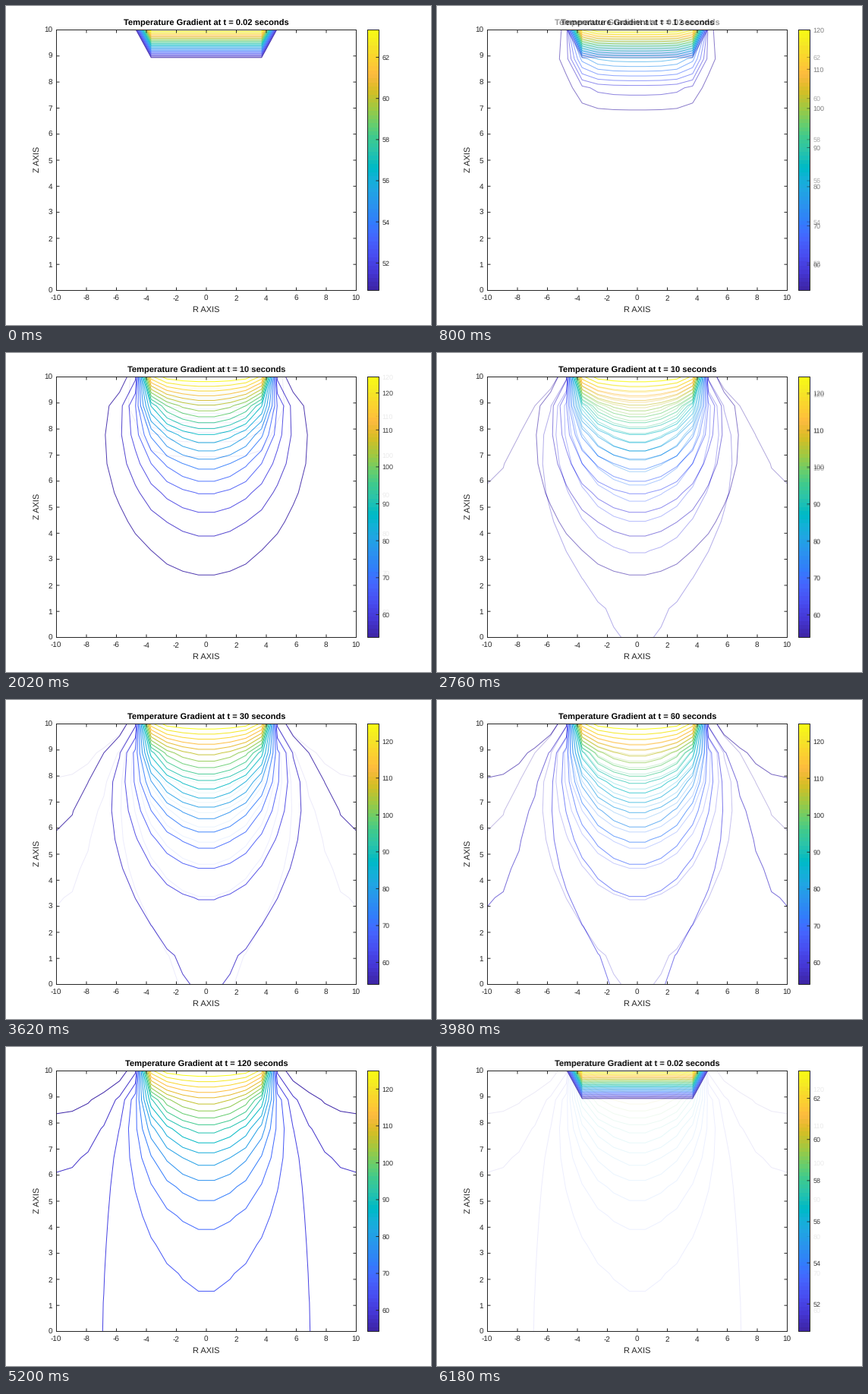
A matplotlib script that plays this animation: 560 px wide and 420 px high, repeating every 6240 ms.

```python
import numpy as np
import matplotlib.pyplot as plt
from matplotlib.animation import FuncAnimation
from matplotlib.colors import LinearSegmentedColormap

W, H, DPI = 560, 420, 100
PT = 72 / DPI                       # points per pixel
STEP_MS, HOLD_MS, FADE_MS, FADES = 20, 500, 60, 9
STAGE_MS = HOLD_MS + FADE_MS * FADES
LEFT, RIGHT, TOP, BOTTOM = 66.5, 461.5, 31.5, 374.5
BAR_LEFT, BAR_RIGHT = 476.5, 491.5
INK = "#262626"
TIMES = ["0.02", "1", "10", "30", "60", "120"]

plt.rcParams["font.family"] = "Liberation Sans"
plt.rcParams["text.hinting"] = "none"

STOPS = {0: "#3E26A8", 4: "#4537D5", 8: "#484DF0", 12: "#4563FD", 14: "#3E6FFF",
         16: "#327CFC", 20: "#2B91EF", 24: "#20A5E3", 27: "#12B1D6", 29: "#01B8CA",
         30: "#02BAC3", 32: "#19BFB6", 34: "#2CC4A7", 37: "#3FCA8E", 40: "#64CD6F",
         44: "#9DC943", 48: "#D1BF27", 50: "#E6BB2D", 52: "#F8BA3D", 53: "#FEBE3C",
         57: "#FAD62D", 60: "#F5E924", 63: "#F9FB15"}
CMAP = LinearSegmentedColormap.from_list(
    "heat", [(i / 63, c) for i, c in STOPS.items()], N=64)


def simulate(times, n=10, size=10.0, dt=0.02):
    """Heat flow in a cylinder, warmed on a disc of its top face (row 0)."""
    d = size / (n - 1)
    fourier = 1.06 * dt / d**2
    biot = 4.43 * d
    col = np.arange(n)
    drive = np.where(col < 4, 82.8, 0.0)
    u = np.zeros((n, n))
    marks = [round(t / dt) for t in times]
    fields = []
    for step in range(1, marks[-1] + 1):
        p = np.pad(u, 1, mode="reflect")    # mirrored edges let no heat out
        up, down = p[:-2, 1:-1], p[2:, 1:-1]
        inner, outer = p[1:-1, :-2], p[1:-1, 2:]
        change = up + down + inner + outer - 4 * u
        change[:, 1:] += (outer - inner)[:, 1:] / (2 * col[1:])
        change[0] += 2 * biot * (drive - u[0])
        u = u + fourier * change
        if step in marks:
            fields.append(50 + u)
    return fields


def px(r):
    return LEFT + (r + 10) / 20 * (RIGHT - LEFT)


def py(z):
    return BOTTOM - z / 10 * (BOTTOM - TOP)


def line(ax, xs, ys):
    ax.plot(xs, ys, color=INK, lw=PT, solid_capstyle="butt",
            solid_joinstyle="miter", snap=False, zorder=5)


def box(ax, x0, x1):
    line(ax, [x0, x1, x1, x0, x0], [TOP, TOP, BOTTOM, BOTTOM, TOP])


def label(ax, x, y, s, size, ha="center", **kw):
    """Text whose capitals are centred on y."""
    kw.setdefault("color", INK)
    ax.text(x, y + 0.36 * size, s, size=size * PT, ha=ha, va="baseline", **kw)


def draw_axes(ax):
    box(ax, LEFT, RIGHT)
    for r in range(-10, 11, 2):
        x = px(r)
        line(ax, [x, x], [BOTTOM, BOTTOM - 4])
        line(ax, [x, x], [TOP, TOP + 4])
        label(ax, x - 0.5, 384.5, str(r), 10)
    for z in range(11):
        y = py(z)
        line(ax, [LEFT, LEFT + 4], [y, y])
        line(ax, [RIGHT, RIGHT - 4], [y, y])
        label(ax, 61, y, str(z), 10, ha="right")
    label(ax, 264, 399, "R AXIS", 11)
    ax.text(41, 202, "Z AXIS", size=11 * PT, color=INK, rotation=90,
            ha="center", va="center")


def draw_bar(ax, low, high):
    ax.imshow(np.arange(64)[:, None], cmap=CMAP, aspect="auto",
              interpolation="nearest", origin="lower",
              extent=(BAR_LEFT, BAR_RIGHT, BOTTOM, TOP))
    box(ax, BAR_LEFT, BAR_RIGHT)
    step = 2 if high - low < 30 else 10
    for v in range(int(np.ceil(low / step)) * step, int(high) + 1, step):
        y = BOTTOM - (v - low) / (high - low) * (BOTTOM - TOP)
        line(ax, [BAR_RIGHT - 4, BAR_RIGHT], [y, y])
        label(ax, 495.6, y, str(v), 9, ha="left")


def render(fig, field, time):
    """Draw one plot and return it as an RGB picture."""
    fig.clear()
    ax = fig.add_axes([0, 0, 1, 1])
    ax.axis("off")
    full = np.hstack([field[:, ::-1], field])
    levels = np.linspace(full.min(), full.max(), 22)[1:-1]
    ax.contour(px(np.linspace(-10, 10, 20)), py(np.linspace(10, 0, 10)), full,
               levels=levels, cmap=CMAP, vmin=levels[0], vmax=levels[-1],
               linewidths=PT)
    draw_axes(ax)
    draw_bar(ax, levels[0], levels[-1])
    label(ax, 264, 21.3, f"Temperature Gradient at t = {time} seconds", 11.1,
          color="black", weight="bold")
    ax.set(xlim=(0, W), ylim=(H, 0))
    fig.canvas.draw()
    return np.array(fig.canvas.buffer_rgba())[..., :3].astype(float)


fig = plt.figure(figsize=(W / DPI, H / DPI), dpi=DPI, facecolor="white")
plots = [render(fig, f, t)
         for f, t in zip(simulate([float(t) for t in TIMES]), TIMES)]
fig.clear()
screen = fig.figimage(plots[0].astype(np.uint8), origin="upper")


def update(frame):
    stage, ms = divmod(frame * STEP_MS, STAGE_MS)
    mix = 0 if ms < HOLD_MS else ((ms - HOLD_MS) // FADE_MS + 1) / (FADES + 1)
    after = plots[(stage + 1) % len(plots)]
    blend = (1 - mix) * plots[stage] + mix * after
    screen.set_data(np.rint(blend).astype(np.uint8))
    return [screen]


anim = FuncAnimation(fig, update, frames=len(TIMES) * STAGE_MS // STEP_MS,
                     interval=STEP_MS, repeat=True, repeat_delay=0)
plt.show()
```
